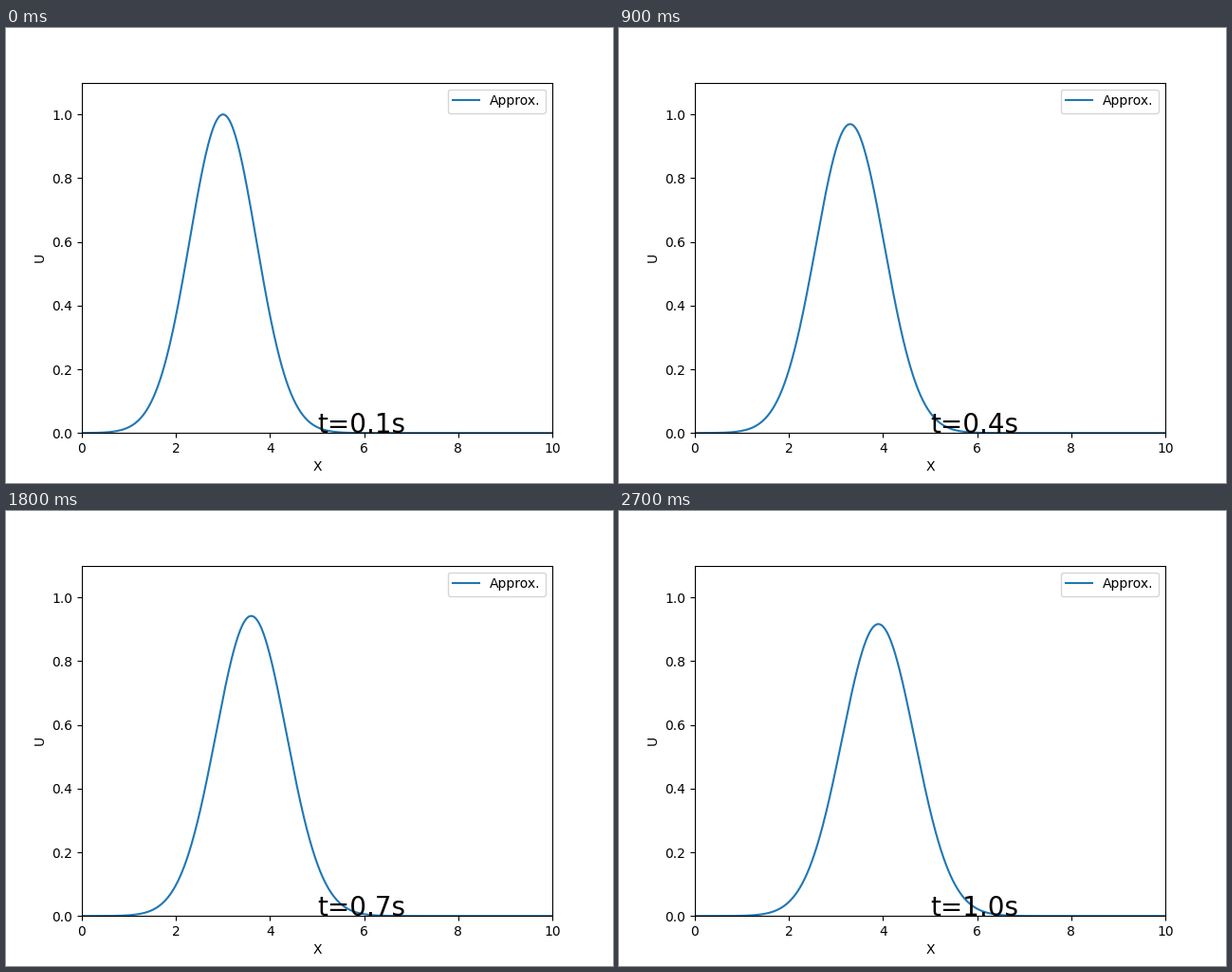
Write a matplotlib script that moves like this. It is 640 px wide and 480 px high and loops after 3000 ms.

```python
import numpy as np
import matplotlib.pyplot as plt
from matplotlib.animation import FuncAnimation

FRAMES = 10
INTERVAL = 300  # ms
STEP = 0.1      # simulated seconds per frame
SPEED = 1.0
DIFFUSION = 0.053
START = 3.0

plt.rcParams["font.family"] = "DejaVu Sans"


def pulse(x, t):
    """Gaussian carried along and spread by advection-diffusion."""
    spread = 1 + 4 * DIFFUSION * t
    return np.exp(-(x - START - SPEED * t) ** 2 / spread) / np.sqrt(spread)


x = np.linspace(0, 10, 1001)
fig, ax = plt.subplots(figsize=(6.4, 4.8), dpi=100)
line, = ax.plot(x, pulse(x, 0), label="Approx.")
clock = ax.text(5, 0, "", fontsize=20)
ax.set(xlim=(0, 10), ylim=(0, 1.1), xlabel="X", ylabel="U")
ax.legend(loc="upper right")


def update(i):
    line.set_ydata(pulse(x, i * STEP))
    clock.set_text(f"t={(i + 1) * STEP:.1f}s")
    return line, clock


anim = FuncAnimation(fig, update, frames=FRAMES, interval=INTERVAL,
                     repeat=True, repeat_delay=0)
plt.show()
```
